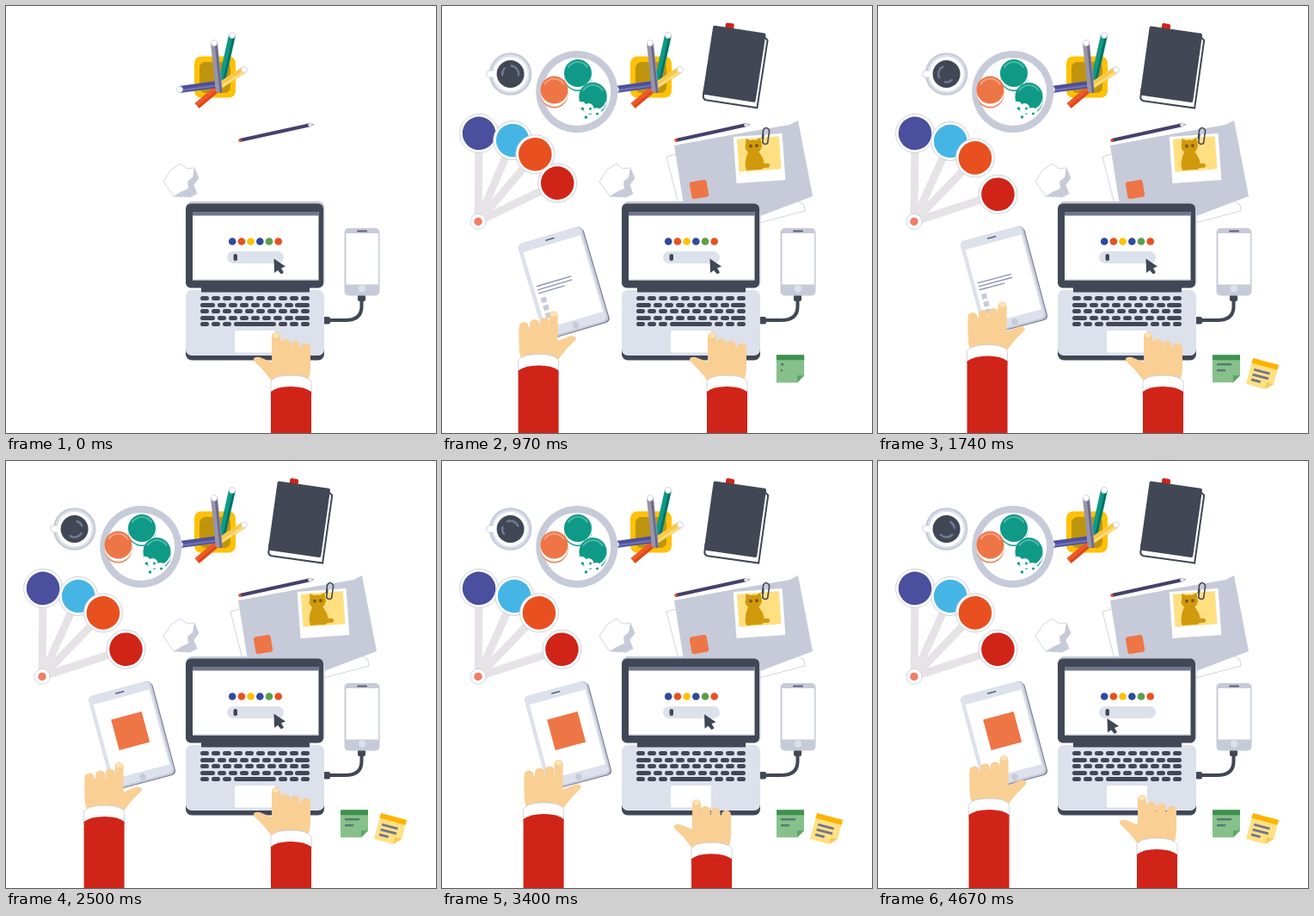
Recreate the animation shown at these times as an HTML page. Size 500x496 px, loop 4700 ms.

```html
<!DOCTYPE html>
<html lang="en">
<head>
<meta charset="utf-8">
<title>Desk</title>
<style>
html, body { margin: 0; width: 100%; height: 100%; overflow: hidden; background: #fff; }
svg { display: block; width: 100%; height: 100%; }
.dark { fill: #414755; }
.mid { fill: #c7cad8; }
.pale { fill: #dce1ec; }
.white { fill: #fff; }
.rim { stroke: #c7cad8; stroke-width: .8; }
.round { fill: none; stroke-linecap: round; }
</style>
</head>
<body>
<svg viewBox="0 0 500 496">
<defs>
  <g id="hand">
    <path fill="#f9cf94" d="M309 436Q305 430 298 422L288 412Q287 407 295 408L310 414 319 398 354 398V420Q354 428 351 436Z"/>
    <g class="round" stroke="#f9cf94">
      <path stroke-width="10" d="M314 384V415"/>
      <path stroke-width="11" d="M324.5 392V415M336 394V415M348.5 397V415"/>
    </g>
    <path class="round" stroke="#fde3bb" stroke-width="5" d="M313 382.500h2"/>
    <path class="white rim" d="M308 452V436Q312 429 331 429T355 436V452Z"/>
    <path fill="#d02418" d="M308 640V448Q315 442 331 442T355 448V640Z"/>
  </g>
  <clipPath id="screen"><path d="M-33-45h66v88h-66z"/></clipPath>
</defs>

<!-- envelope with photo and clip -->
<g id="envelope"><g transform="translate(-345 -200)">
  <path class="white rim" d="M261 175 272 172 340 180 421 231 422 238 365 253 280 250Z"/>
  <path class="mid" d="M270 162 340 149 404 138 414 133 431 221 370 244 285 256Z"/>
  <rect x="-10" y="-10" width="20" height="20" rx="3" fill="#ee7546" transform="translate(299 213) rotate(-10)"/>
</g></g>
<g id="photo">
  <path class="white" d="M-28.500-27h57v54h-57z"/>
  <path fill="#ffdf80" d="M-24.500-24h49v38h-49z"/>
  <g fill="#d09a0c">
    <ellipse cx="-6" cy="-14" rx="9.500" ry="8"/>
    <path d="M-15-14-14-24-8-21H-3L3-24 4-13ZM-12-9Q-19 4-16 13H2Q7 8 4 0 1-6-1-9Z"/>
    <path class="round" stroke="#d09a0c" stroke-width="5" d="M0 10Q5 8 9 9"/>
  </g>
  <g fill="#7a5b10"><circle cx="-9" cy="-15" r="2"/><circle cx="-2" cy="-15" r="2"/></g>
</g>
<path id="clip" class="round" stroke="#414755" stroke-width="1.600" d="M-2 8V17Q1 20 4 17V2Q0-3-3 2V12"/>

<!-- pen cup -->
<rect x="219" y="58.500" width="48" height="48" rx="8" fill="#ffc107"/>
<rect x="225" y="65" width="36" height="36" rx="7" fill="#bf940f"/>
<g id="pens"></g>

<!-- plate of cookies -->
<g id="plate"><circle class="mid" r="47.500"/><circle class="white" r="39.500"/></g>
<g id="cookie1"></g>
<g id="cookie2"></g>
<g id="cookie3"></g>

<!-- pencil and crumpled paper -->
<path stroke="#45406b" stroke-width="4" d="M272 156 352 138.500"/>
<path class="white" stroke="#77748a" stroke-width=".6" d="M351 136.500 358 137.500 352 140.500Z"/>
<path fill="#e8501f" d="M270 155l3-1 1 3-3 1z"/>
<path class="white rim" d="M183 204 192 190 203 183 210 189 219 188 224 200 218 208 222 218 214 222 195 221Z"/>
<path class="mid" d="M219 188 224 200 218 208 222 218 214 222 195 221 203 216 212 212 211 204 217 199Z"/>

<!-- book -->
<g id="book">
  <path class="white" stroke="#414755" stroke-width="2" d="M-32 30V40Q-31 43.500-28 43.500H32V-36L28-39Z"/>
  <rect x="-19" y="-49" width="10" height="9" rx="2" fill="#d02418"/>
  <rect class="dark" x="-33" y="-43.500" width="62" height="81" rx="2"/>
</g>

<!-- coffee -->
<g id="cup">
  <circle class="mid" r="24.800"/><circle class="pale" r="22.500"/>
  <rect class="white rim" x="-28" y="-4" width="14" height="8" rx="4"/>
  <circle class="white" r="20"/><circle class="dark" r="16"/>
  <path id="swirl" class="round" stroke="#707b91" stroke-width="2.500" d="M-9 3A9.500 9.500 0 0 0 3 9M8-5A9.500 9.500 0 0 1 9 3"/>
</g>

<g id="fan"><g id="lollies"></g><circle class="white rim" r="9"/><circle fill="#f47c64" r="4.700"/></g>

<!-- sticky notes -->
<g id="green">
  <path fill="#86c08a" d="M-16-16h32v24l-8 8h-24z"/><path fill="#3f9150" d="M-16-16h32v6h-32z"/><path fill="#5ba568" d="M16 8h-8v8z"/>
  <path id="greenLines" stroke="#587b72" stroke-width="2.500" d="M0 0h17M0 7h10"/>
</g>
<g id="yellow">
  <path fill="#ffe082" d="M-15.500-15.500h31v23l-8 8h-23z"/><path fill="#ffb300" d="M-15.500-15.500h31v6h-31z"/><path fill="#f3cb57" d="M15.500 7.500h-8v8z"/>
  <path id="yellowLines" stroke="#70758f" stroke-width="2.800" d="M0 0h19M0 6h19M0 12h11"/>
</g>

<!-- phone and cable -->
<path class="round" stroke="#414755" stroke-width="4" d="M374 365H394Q413.500 365 413.500 349V338"/>
<rect class="dark" x="369" y="361" width="8" height="8.500" rx="2"/>
<rect class="dark" x="409" y="335" width="9" height="8" rx="2"/>
<rect class="mid" x="393.500" y="258" width="41" height="78.500" rx="5"/>
<path class="white" d="M395.500 264h37.500v59.500h-37.500z"/>
<path class="round" stroke="#5c6280" stroke-width="2" d="M409 261.500h10"/>
<circle class="pale" cx="414" cy="328.500" r="4.200"/>

<!-- laptop -->
<rect class="mid" x="209.500" y="227" width="161" height="100" rx="7"/>
<rect class="dark" x="209" y="229.500" width="160" height="98" rx="6"/>
<path class="white" d="M217 239h146.500v79.500h-146.500z"/>
<path fill="#70758f" d="M217 239h146.500v4.500h-146.500z"/>
<path stroke="#c7cad8" d="M217 318h146.500"/>
<rect class="dark" x="209" y="345" width="161" height="66.500" rx="7"/>
<rect class="pale" x="209" y="330" width="161" height="76" rx="7"/>
<path class="dark" d="M227 327h126v5.500h-126z"/>
<g class="round" stroke="#414755" stroke-width="5">
  <path stroke-dasharray="5 8" d="M228.500 339.500H351M248.500 347.500H333M228.500 354.500H351M248.500 362.500H333M228.500 369.500H261M319.500 369.500H351"/>
  <path d="M228.500 347.500h12M338.500 347.500h12M228.500 362.500h12M338.500 362.500h12M267.500 369.500h44"/>
</g>
<rect class="white" x="266" y="377" width="47" height="25.500" rx="2"/>
<g id="dots"></g>
<rect class="pale" x="257" y="285" width="66" height="14" rx="7"/>
<rect id="caret" class="dark" x="264.500" y="288" width="4.500" height="8" rx="2"/>
<path id="cursor" class="dark" d="M0 0 .5 16.500 4.500 13.500 8.500 18 11.500 16 8.500 11 13.500 9Z"/>
<g id="right"><use href="#hand"/></g>

<!-- tablet -->
<g id="tablet">
  <rect fill="#70758f" x="-36" y="-53" width="74" height="109" rx="5"/>
  <rect class="mid" x="-37" y="-55" width="74" height="110" rx="5"/>
  <rect class="pale" x="-37" y="-55" width="72" height="108" rx="5"/>
  <path class="white" d="M-33-45h66v88h-66z"/>
  <path class="round" stroke="#5c6280" stroke-width="1.500" d="M-5-50.500h9"/>
  <circle class="mid" cy="49" r="3.700"/>
  <g clip-path="url(#screen)"><g id="pages">
    <path stroke="#8b93b3" stroke-width="1.300" d="M-29.500-4.500h40M-29.500-.5h40M-29.500 3.500h30"/>
    <path class="mid" d="M-29 9h6v6h-6zM-29 18h6v6h-6zM-29 27h6v6h-6z"/>
    <path fill="#ee7546" d="M53-23h36v36h-36z"/>
  </g></g>
</g>
<g id="left"><use href="#hand"/></g>
</svg>

<script>
const LOOP = 4700;
const el = id => document.getElementById(id);
const put = (id, x, y, angle = 0, sx = 1, sy = sx) =>
  el(id).setAttribute('transform', `translate(${x} ${y}) rotate(${angle}) scale(${sx} ${sy})`);

// Smooth path through [time, ...values] keys, without overshoot.
function key(t, ...keys) {
  const last = keys.length - 1;
  if (t <= keys[0][0]) return keys[0].slice(1);
  if (t >= keys[last][0]) return keys[last].slice(1);
  const i = keys.findIndex(k => k[0] > t) - 1;
  const span = keys[i + 1][0] - keys[i][0], u = (t - keys[i][0]) / span;
  return keys[0].slice(1).map((_, n) => {
    const c = n + 1;
    const slope = j => (keys[j + 1][c] - keys[j][c]) / (keys[j + 1][0] - keys[j][0]);
    const tangent = j => {
      if (j === 0 || j === last) return 0;
      const a = slope(j - 1), b = slope(j);
      return a * b <= 0 ? 0 : 2 * a * b / (a + b);
    };
    const v = 1 - u;
    return keys[i][c] * (1 + 2 * u) * v * v + keys[i + 1][c] * u * u * (3 - 2 * u)
      + span * u * v * (tangent(i) * v - tangent(i + 1) * u);
  });
}

// Scale from 0 to 1 with a small overshoot.
function pop(t, start, length = 430) {
  const u = Math.min(1, Math.max(0, (t - start) / length)) - 1;
  return Math.max(0, 1 + 2.7 * u ** 3 + 1.7 * u * u);
}

const pen = (color, shade, x1, y1, x2, y2, tip = true) => `
  <path stroke="${color}" stroke-width="8" d="M${x1} ${y1}L${x2} ${y2}"/>
  <path stroke="${shade}" stroke-width="2.500" d="M${x1 + 2} ${y1 + 1}L${x2 + 2} ${y2 + 1}"/>
  ${tip ? `<circle class="white rim" cx="${x1}" cy="${y1}" r="3.500"/>` : ''}`;
el('pens').innerHTML =
  pen('#0e9a87', '#0a6f62', 263, 34, 250, 92) +
  pen('#f9c84a', '#ffdf80', 277, 74, 248, 93) +
  pen('#ef5a28', '#d9481a', 222, 116, 247, 95, false) +
  pen('#4c4f9b', '#6d70b5', 202, 97, 246, 91) +
  pen('#9795a8', '#6a688c', 242, 43, 248, 100);

const cookie = (color, shine) => `
  <circle fill="${color}" cy="4" r="16"/><circle class="white" cy="2.500" r="16"/>
  <circle fill="${color}" cy="-1" r="16"/>
  <path class="round" stroke="${shine}" stroke-width="2" d="M-11-8A13 13 0 0 1 11-8"/>`;
const circles = (color, ...spots) => spots.map(([x, y, r]) =>
  `<circle fill="${color}" cx="${x}" cy="${y}" r="${r}"/>`).join('');
el('cookie1').innerHTML = cookie('#0e9a87', '#4db8a8');
el('cookie2').innerHTML = cookie('#ee7546', '#f6a281');
el('cookie3').innerHTML = cookie('#0e9a87', '#4db8a8') +
  circles('#fff', [-13, 10, 5], [-5, 13, 6], [4, 18, 6]) +
  circles('#0e9a87', [-12, 13, 1.7], [-3, 13, 1.5], [-8, 23, 1.7], [5, 19, 1.5]);

el('dots').innerHTML = circles('#2f4a9c', [263.2, 273.5, 4.3], [295.3, 273.5, 4.3]) +
  circles('#e8501f', [273.9, 273.5, 4.3], [316.7, 273.5, 4.3]) +
  circles('#ffc107', [284.6, 273.5, 4.3]) + circles('#5b9f4a', [306, 273.5, 4.3]);

const lollies = [['#4a4f9e', 0.6], ['#45b5e6', 24.3], ['#e8501f', 43.8], ['#d02418', 72]];
el('lollies').innerHTML = lollies.map(([color], i) => `
  <g id="lolly${i}"><path stroke="#e6e3e6" stroke-width="9" d="M0 0V-85"/>
  <circle class="white rim" cy="-102.500" r="22.500"/><circle fill="${color}" cy="-102.500" r="19.300"/></g>`).join('');

function draw(t) {
  put('envelope', 345, 200, 0, pop(t, 150, 500));
  put('photo', 369, 177, -4, pop(t, 440));
  put('clip', 377, 142, 8, pop(t, 540));
  put('plate', 156.8, 99.6, 0, pop(t, 430, 450));
  put('cookie1', 158, 79, 0, pop(t, 470));
  put('cookie2', 130.5, 98.5, 0, pop(t, 540));
  put('cookie3', 175.5, 106, 0, pop(t, 580));
  put('book', ...key(t, [420, 332, 64, -5], [570, 333.5, 65, 0], [850, 340.5, 70, 9], [1250, 342.5, 71, 8]), pop(t, 420, 400));
  put('cup', 79.6, 79, 0, pop(t, 565, 400));
  put('swirl', 0, 0, -t * 0.16);

  put('fan', 42, 250.4, 0, pop(t, 600, 370));
  lollies.forEach(([, angle], i) => {
    const [open] = key(t, [640, 0], [970, 0.98 - i * 0.03], [1500, 1]);
    put('lolly' + i, 0, 0, angle * open);
  });

  put('green', 405, 421.3, 0, pop(t, 820, 400));
  put('greenLines', -11, -5, 0, key(t, [900, 0], [1150, 1])[0], 1);
  put('yellow', 447, 428, 15, pop(t, 1070, 400));
  put('yellowLines', -11, -3, 0, key(t, [1200, 0], [1500, 1])[0], 1);

  const blink = Math.cos(2 * Math.PI * (t * 6 / LOOP - 0.15));
  el('caret').setAttribute('opacity', Math.min(1, 0.8 + 0.5 * blink));
  put('cursor', ...key(t, [3100, 311.5, 293.5], [4360, 266.5, 299]));
  put('right', ...key(t, [2500, 0, 0], [3550, -19, 15], [4320, -7, 9]));

  put('tablet', ...key(t, [300, 110, 425, -67, 0], [570, 129.5, 367, -39, 0.54],
    [970, 141, 321.5, -16.5, 1.05], [1500, 146, 318.5, -15, 1.02]));
  put('pages', ...key(t, [1850, 0, 0], [2400, -71, 0]));
  const [x, y] = key(t, [250, 70, 160], [570, 70, -13], [970, 89, -24.5], [1740, 104, -35.5],
    [2500, 91, -29], [3400, 95, -32], [4690, 106, -37]);
  put('left', x + 354.6, y, 0, -1, 1);
}

const start = performance.now();
function frame() {
  draw((performance.now() - start) % LOOP);
  requestAnimationFrame(frame);
}
frame();
</script>
</body>
</html>
```
